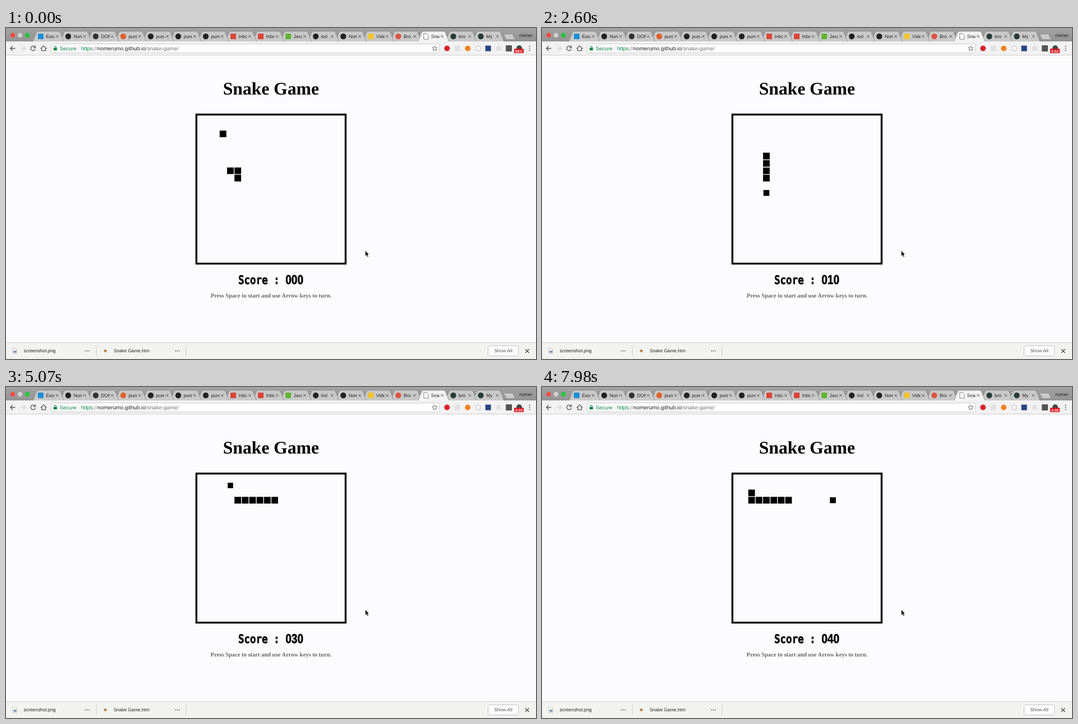
Recreate the animation shown at these times as an HTML page. Size 947 by 592 pixels, loop 8 s.

```html
<!DOCTYPE html>
<html lang="en">
<head>
<meta charset="utf-8">
<title>Snake Game</title>
<style>
html, body { margin: 0; width: 100%; height: 100%; overflow: hidden; background: #fcfcfe; }
svg { display: block; width: 947px; height: 592px; }
svg svg { width: auto; height: auto; }
text { font-family: "Liberation Sans", Arial, sans-serif; font-size: 8.4px; fill: #222; white-space: pre; text-rendering: geometricPrecision; }
.page { font-family: "Liberation Serif", Times, serif; font-weight: bold; text-anchor: middle; }
.score { font-size: 19px; font-weight: bold; fill: #000; stroke: #000; stroke-width: .5; }
.label { font: bold 17.54px "DejaVu Sans Mono", monospace; }
.line { fill: none; stroke: #555; stroke-width: 1.3; }
.faint { stroke: #d2d2d2; }
</style>
</head>
<body>
<svg viewBox="0 0 947 592">
  <defs>
    <linearGradient id="strip" x2="0" y2="1">
      <stop stop-color="#a3a3a3"/><stop offset="1" stop-color="#929292"/>
    </linearGradient>
  </defs>

  <rect width="947" height="25" fill="url(#strip)"/>
  <circle cx="12" cy="13" r="4.2" fill="#fb4a48"/>
  <circle cx="25" cy="13" r="4.2" fill="#cfcfcf"/>
  <circle cx="38.2" cy="13" r="4.2" fill="#25c63c"/>
  <g id="tabs"></g>
  <path d="M889 11H905L910 20.5H894Z" fill="#c9c9c9" stroke="#858585" stroke-width=".6"/>
  <text x="917" y="16">nomer</text>

  <rect y="24" width="947" height="24.5" fill="#f2f2f2"/>
  <path d="M0 48.5H947" stroke="#cfcfcf"/>
  <path class="line" d="M16.500 36.500H8M12 32.300L7.800 36.500L12 40.700"/>
  <path class="line faint" d="M26 36.500H34.500M30.500 32.300L34.700 36.500L30.500 40.700"/>
  <path class="line" d="M51.500 33.500A4.200 4.200 0 1 0 52.400 37.500M52.300 31.500V35H48.800"/>
  <path class="line" d="M62 37L67.200 31.800L72.400 37M63.800 36V40.700H70.600V36"/>
  <rect x="80.500" y="28.500" width="694" height="16" rx="2" fill="#fff" stroke="#cbcbcb"/>
  <path d="M85 35.500H91V40H85Z" fill="#0b8043"/>
  <path d="M86.400 35.500V34A1.600 1.600 0 0 1 89.600 34V35.500" fill="none" stroke="#0b8043"/>
  <text x="96" y="39.500" style="font-size:9.5px;fill:#0b8043">Secure</text>
  <path d="M130 31V42" stroke="#d0d0d0"/>
  <text x="134" y="39.500" style="font-size:9.75px;fill:#777"><tspan fill="#0b8043">https</tspan>://<tspan fill="#222">nomerumo.github.io</tspan>/snake-game/</text>
  <path d="M766 31.800L767.300 35H770.700L768 37.200L769 40.600L766 38.600L763 40.600L764 37.200L761.300 35H764.700Z" fill="none" stroke="#666" stroke-width=".9"/>
  <circle cx="788" cy="36.500" r="5" fill="#d8242c"/>
  <rect x="801.500" y="31.500" width="10" height="10" rx="2" fill="#e2e2e2"/>
  <circle cx="825" cy="36.500" r="5" fill="#f08326"/>
  <circle cx="843.500" cy="36.500" r="4.800" fill="#f2f2f2" stroke="#bdbdbd"/>
  <rect x="856.500" y="31.500" width="10" height="10" fill="#29457f"/>
  <circle cx="880" cy="36.500" r="4.800" fill="#e0e0e0"/>
  <rect x="893" y="31" width="11" height="11" rx="1" fill="#555"/>
  <circle cx="917" cy="36" r="5" fill="#3b4a46"/>
  <rect x="908" y="37" width="17" height="8" rx="1" fill="#dc0d17"/>
  <text id="badge" x="916.500" y="43.500" text-anchor="middle" style="font-size:6.5px;font-weight:bold;fill:#fff"></text>
  <path d="M935.500 32.500h.01m0 3.700h.01m0 3.700h.01" stroke="#555" stroke-width="2" stroke-linecap="round"/>

  <text class="page" x="473.500" y="119" style="font-size:31.68px;fill:#000">Snake Game</text>
  <rect x="340.200" y="154.800" width="266.600" height="266.600" fill="none" stroke="#000" stroke-width="3.300"/>
  <path id="cells"/>
  <g transform="translate(0 458) scale(1 1.22)">
    <text class="score label" x="415" y="0">Score :</text>
    <text class="score" id="score" x="499.500" y="0"></text>
  </g>
  <text class="page" x="473.500" y="482" style="font-size:10.56px;fill:#666">Press Space to start and use Arrow keys to turn.</text>
  <path d="M642 398V408.300L644.300 406.300L646 410L647.700 409.200L646.100 405.700H649Z" stroke="#fff" stroke-width=".7"/>

  <rect y="562" width="947" height="30" fill="#f2f2f0"/>
  <path d="M0 562.500H947" stroke="#cdcdcd"/>
  <path d="M161.500 568V587M321.500 568V587" stroke="#cfcfcf"/>
  <path d="M12 572.500H17L19 574.500V582.500H12Z" fill="#fff" stroke="#aaa" stroke-width=".7"/>
  <rect x="13.500" y="577" width="5" height="4" fill="#8296b8"/>
  <text x="31.500" y="580.300">screenshot.png</text>
  <circle cx="177.500" cy="577.500" r="2.400" fill="#b07a35"/>
  <text x="192.500" y="580.300" style="font-size:8.2px">Snake Game.htm</text>
  <path d="M142 577.500h.01m3.300 0h.01m3.300 0h.01M303 577.500h.01m3.300 0h.01m3.300 0h.01" stroke="#555" stroke-width="1.800" stroke-linecap="round"/>
  <rect x="861.500" y="568.500" width="54" height="18" rx="2" fill="#fff" stroke="#c4c4c8"/>
  <text x="888.500" y="580.300" text-anchor="middle" style="font-size:8.5px;fill:#555">Show All</text>
  <path d="M928 574.500L934.500 581M934.500 574.500L928 581" stroke="#444" stroke-width="1.200"/>
</svg>
<script>
const LOOP = 8000, STEP = 150, PITCH = 13.2, CELL = 11.88;
const byId = id => document.getElementById(id);

// Tabs: title, icon colour, icon shape (c circle, s square, d document)
const ACTIVE = 14, CHAT = 8;
const tabs = [
  ['Easy', '#1c8fd6', 's'], ['Nomer', '#222', 'c'], ['DOM', '#333', 'c'], ['pure', '#e0602c', 'c'],
  ['pure', '#222', 'c'], ['pure', '#222', 'c'], ['pure', '#222', 'c'], ['Inbox', '#d9453a', 's'],
  ['Inbox', '#d9453a', 's'], ['Java', '#5fb530', 's'], ['lod', '#222', 'c'], ['Nomer', '#222', 'c'],
  ['Video', '#f0c52e', 's'], ['Bro', '#db5545', 'c'], ['Snake', '#fff', 'd'], ['bro', '#263a38', 'c'],
  ['My', '#263a38', 'c']
];

const icons = {
  c: (x, fill) => `<circle cx="${x}" cy="15" r="5.2" fill="${fill}"/>`,
  s: (x, fill) => `<rect x="${x - 5}" y="10" width="10" height="10" rx="1" fill="${fill}"/>`,
  d: (x, fill) => `<path d="M${x - 3.5} 10h5l3 3v7h-8z" fill="${fill}" stroke="#666" stroke-width=".8"/>`
};

function tabMarkup([title, colour, shape], i) {
  const x = 62 + i * 49.15, active = i === ACTIVE;
  return `<path d="M${x - 14} 24.500L${x - 7.5} 8Q${x - 6.5} 6 ${x - 4.5} 6H${x + 32}Q${x + 34} 6 ${x + 35} 8L${x + 41.5} 24.500Z"
      fill="${active ? '#f2f2f2' : '#c9c9c9'}" stroke="#858585" stroke-width=".7"/>
    ${icons[shape](x, colour)}
    <svg x="${x + 9.5}" y="5" width="15" height="18"><text id="tab${i}" y="13">${title}</text></svg>
    <path d="M${x + 27} 12.700l4.600 4.600m0-4.600l-4.600 4.600" stroke="#555" stroke-width="1"/>`;
}

// Each tab overlaps the next one; the active tab lies on top
const order = tabs.map((_, i) => i).filter(i => i !== ACTIVE).reverse().concat(ACTIVE);
byId('tabs').innerHTML = order.map(i => tabMarkup(tabs[i], i)).join('');

// The head's route over the 20 x 20 board
const turns = { U: [0, -1], D: [0, 1], L: [-1, 0], R: [1, 0] };
const route = [[5, 8]];
for (const [dir, count] of 'U1 L2 U6 R2 D2 L1 D8 R1 U8 R6 U1 L7 U1 L2 D2 R5'.split(' ')) {
  for (let n = 0; n < +count; n++) {
    const [x, y] = route[route.length - 1], [dx, dy] = turns[dir];
    route.push([x + dx, y + dy]);
  }
}
const meals = [8, 21, 33, 46];
const foods = [...meals.map(i => route[i]), [13, 3]];

function square([col, row], size = CELL) {
  const inset = (CELL - size) / 2;
  const x = 342.2 + col * PITCH + inset, y = 157 + row * PITCH + inset;
  return `M${x} ${y}h${size}v${size}h${-size}z`;
}

function draw(t) {
  const head = Math.min(2 + Math.floor((t + 50) / STEP), route.length - 1);
  const eaten = meals.filter(i => i <= head).length;
  const body = route.slice(head - 2 - eaten, head + 1);
  const foodSize = Math.min(CELL, 10.7 + 2.7 * Math.cos((t + 110) / 1200 * 2 * Math.PI));
  const seconds = Math.floor((t + 100) / 1000);

  byId('cells').setAttribute('d', body.map(cell => square(cell)).join('') + square(foods[eaten], foodSize));
  byId('score').textContent = String(eaten * 10).padStart(3, '0');
  byId('badge').textContent = seconds ? '0:0' + seconds : 'REC';
  byId('tab' + CHAT).textContent = t >= 960 && t < 1960 ? 'Fan' : tabs[CHAT][0];
}

const start = performance.now();
function tick() {
  draw((performance.now() - start) % LOOP);
  requestAnimationFrame(tick);
}
tick();
</script>
</body>
</html>
```
